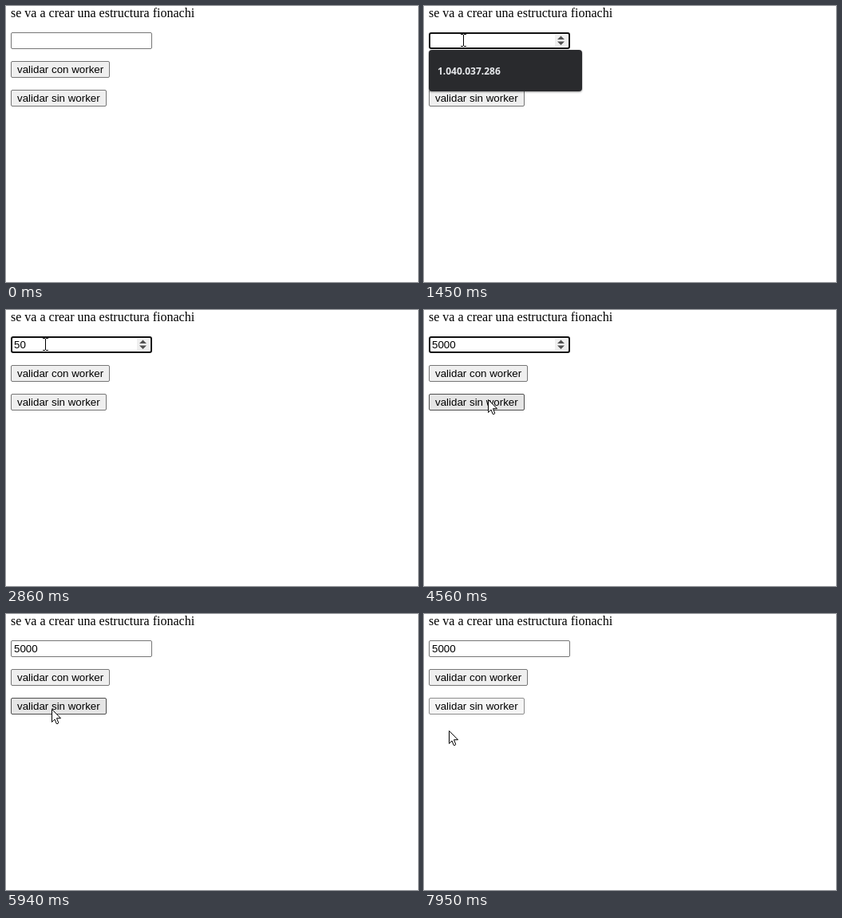
Recreate the animation shown at these times as an HTML page. Size 516 by 346 pixels, loop 8000 ms.

```html
<!DOCTYPE html>
<html lang="es">
<head>
<meta charset="utf-8">
<title>Fionachi</title>
<style>
  html, body { margin: 0; width: 100%; height: 100%; overflow: hidden; background: #fff; }
  svg { display: block; width: 100vw; height: 100vh; }
  text { white-space: pre; }
  .title { font: 16px "Liberation Serif", serif; }
  .ui { font: 13.333px "Liberation Sans", sans-serif; }
  .hint { font: 700 12px "Open Sans", sans-serif; fill: #e8eaed; }
</style>
</head>
<body>
<svg viewBox="0 0 516 346">
  <defs>
    <filter id="shade" x="-10%" y="-20%" width="120%" height="150%" color-interpolation-filters="sRGB">
      <feDropShadow dx="0" dy="1" stdDeviation="1.2" flood-opacity=".4"/>
    </filter>
  </defs>
  <text class="title" x="6" y="14">se va a crear una estructura fionachi</text>

  <rect id="field" fill="#fff"/>
  <text id="value" class="ui" x="10" y="48"></text>
  <rect id="caret" y="36" width="1" height="15"/>
  <g id="spin">
    <rect x="164" y="36" width="15" height="15" fill="#efefef"/>
    <path d="M167 42 L171.5 37.5 L176 42Z M167 44.5 L171.5 49 L176 44.5Z" fill="#505050"/>
  </g>

  <g id="con">
    <rect x="6.5" y="69.5" width="123" height="20" rx="1.5"/>
    <text class="ui" x="14" y="84">validar con worker</text>
  </g>
  <g id="sin">
    <rect x="6.5" y="105.5" width="119" height="20" rx="1.5"/>
    <text class="ui" x="14" y="120">validar sin worker</text>
  </g>

  <g id="popup">
    <rect x="6" y="55" width="192" height="52" rx="4" fill="#292a2d" filter="url(#shade)"/>
    <text class="hint" x="17" y="86">1.040.037.286</text>
  </g>

  <path id="arrow" d="M.5 .5 V16.5 L4 13 L6.2 18.5 H8 L8.7 17.2 L6.5 11.7 H11.5Z" fill="#fff" stroke="#000"/>
  <path id="beam" d="M-3 -7.5 H0 M1 -7.5 H4 M.5 -7 V7 M-3 7.5 H0 M1 7.5 H4" fill="none" stroke="#000"/>
</svg>
<script>
const LOOP = 8000, STEP = 76, BLINK = 530;
const FOCUS = 920, POPUP = 1070, PRESS = 4640, RELEASE = 4710, FREEZE = 6800;
const SWIRL = 7340, SWIRL_END = 7950;
const KEYS = [1910, 2310, 3010, 3870];

const $ = id => document.getElementById(id);
const set = (el, attrs) => { for (const k in attrs) el.setAttribute(k, attrs[k]); };
const show = (id, on) => set($(id), { visibility: on ? "visible" : "hidden" });
const within = (t, a, b) => t >= a && t < b;
const easeOut = u => 1 - (1 - u) ** 2;

// Pointer stops: time, x, y
const stops = [
  [380, 294, 278], [FOCUS, 49, 43],
  [4400, 49, 43], [4560, 80, 112],
  [RELEASE, 80, 112], [4950, 90, 175], [5100, 90, 154],
  [5790, 53, 119], [5939, 53, 119], [5940, 57, 119]
];

const looks = {
  normal: { fill: "#efefef", stroke: "#767676" },
  hover: { fill: "#e5e5e5", stroke: "#4f4f4f" },
  active: { fill: "#f5f5f5", stroke: "#8d8d8d" }
};

// Share of a to b passed at t, in whole screen updates
function progress(t, a, b) {
  return Math.min(1, Math.floor((t - a) / STEP) * STEP / (b - a));
}

// One shrinking round below the button
function swirl(u) {
  const a = 2 * Math.PI * u;
  return [57 - 25 * u + 35 * Math.sin(a), 119 + 27 * u + 22 * (1 - Math.cos(a))];
}

function pointer(t) {
  if (t < stops[0][0]) return null;
  if (t >= SWIRL) return swirl(progress(t, SWIRL, SWIRL_END)).map(Math.round);
  const i = stops.findLastIndex(s => t >= s[0]);
  const [a, ...from] = stops[i];
  const [b, ...to] = stops[i + 1] || [LOOP, ...from];
  const u = easeOut(progress(t, a, b));
  return from.map((v, k) => Math.round(v + (to[k] - v) * u));
}

function over(p, x, y, w) {
  return !!p && within(p[0], x, x + w) && within(p[1], y, y + 21);
}

function button(id, hover, active) {
  set($(id).firstElementChild, looks[active ? "active" : hover ? "hover" : "normal"]);
}

function render(t) {
  const p = pointer(t);
  const focus = within(t, FOCUS, PRESS);
  const inField = over(p, 6, 33, 177);
  const frozen = t >= FREEZE;

  set($("field"), focus
    ? { x: 7, y: 34, width: 175, height: 19, rx: 2, stroke: "#101010", "stroke-width": 2 }
    : { x: 6.5, y: 33.5, width: 176, height: 20, rx: 1.5, stroke: "#767676", "stroke-width": 1 });
  show("spin", focus || inField);

  // Each key restarts the caret's blinking
  const typed = KEYS.filter(k => t >= k).length;
  const since = t - (typed ? KEYS[typed - 1] : FOCUS);
  $("value").textContent = "5000".slice(0, typed);
  set($("caret"), { x: Math.round(10 + typed * 7.415) });
  show("caret", focus && since % (2 * BLINK) < BLINK);
  show("popup", within(t, POPUP, KEYS[0]));

  button("con", !frozen && over(p, 6, 69, 124), false);
  button("sin", over(p, 6, 105, 120), frozen || within(t, PRESS, RELEASE));

  show("arrow", p && !inField);
  show("beam", p && inField);
  if (p) set($(inField ? "beam" : "arrow"), { transform: `translate(${p})` });
}

const start = performance.now();
function tick() {
  render((performance.now() - start) % LOOP);
  requestAnimationFrame(tick);
}
tick();
</script>
</body>
</html>
```
